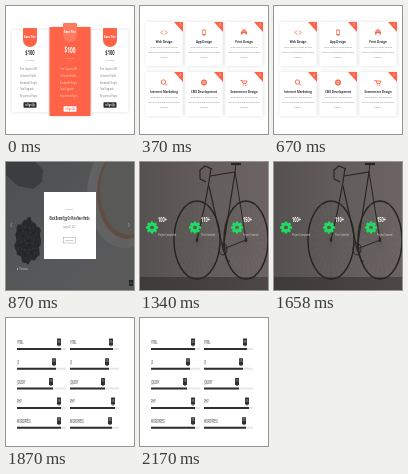
These frames come from a looping animation (128x128 px, 2370 ms). An HTML page with a canvas:

```html
<!DOCTYPE html>
<html lang="en">
<head>
<meta charset="utf-8">
<style>
  html, body { margin: 0; width: 100%; height: 100%; overflow: hidden; background: #fff; }
  canvas { display: block; width: 100vw; height: 100vh; }
</style>
</head>
<body>
<canvas id="stage"></canvas>
<script>
const SIZE = 128;
const canvas = document.getElementById('stage');
const ctx = canvas.getContext('2d');
const CORAL = '#ff6347', DARK = '#2e2e33', GREEN = '#20dc62';
const COLUMNS = [24, 64, 104];

function box(x, y, w, h, fill, radius = 0) {
  ctx.fillStyle = fill;
  ctx.beginPath();
  ctx.roundRect(x, y, w, h, radius);
  ctx.fill();
}

function shape(points, fill) {
  ctx.fillStyle = fill;
  ctx.beginPath();
  points.forEach(([x, y]) => ctx.lineTo(x, y));
  ctx.closePath();
  ctx.fill();
}

function disc(x, y, rx, fill, ry = rx) {
  ctx.fillStyle = fill;
  ctx.beginPath();
  ctx.ellipse(x, y, rx, ry, 0, 0, 7);
  ctx.fill();
}

function line(points, stroke, width) {
  ctx.strokeStyle = stroke;
  ctx.lineWidth = width;
  ctx.beginPath();
  points.forEach(([x, y]) => ctx.lineTo(x, y));
  ctx.stroke();
}

function ring(x, y, rx, stroke, width, ry = rx) {
  ctx.strokeStyle = stroke;
  ctx.lineWidth = width;
  ctx.beginPath();
  ctx.ellipse(x, y, rx, ry, 0, 0, 7);
  ctx.stroke();
}

function gradient(x, y, ...colors) {
  const fill = ctx.createLinearGradient(0, 0, x, y);
  colors.forEach((color, i) => fill.addColorStop(i / (colors.length - 1), color));
  return fill;
}

// The condensed lettering shares one horizontal squeeze.
function label(text, x, y, size, fill, { weight = 400, align = 'center', squeeze = 0.78 } = {}) {
  ctx.save();
  ctx.translate(x, y);
  ctx.scale(squeeze, 1);
  ctx.font = `${weight} ${size}px "Open Sans", sans-serif`;
  ctx.textAlign = align;
  ctx.textBaseline = 'middle';
  ctx.fillStyle = fill;
  ctx.fillText(text, 0, 0);
  ctx.restore();
}

function card(x, y, w, h, fill = '#fff') {
  ctx.save();
  ctx.shadowColor = 'rgba(0,0,0,.13)';
  ctx.shadowBlur = 4 * canvas.width / SIZE;
  box(x, y, w, h, fill);
  ctx.restore();
}

function pricing() {
  box(0, 0, SIZE, SIZE, '#fff');
  const features = ['Free Support 24H', 'Unlimited Traffic', 'Bandwidth Single', 'Total Upgrade', 'Responsive Pages'];
  COLUMNS.forEach((x, i) => {
    const main = i === 1;
    const ink = main ? '#fff' : DARK;
    const soft = main ? '#ffd8cf' : '#77777c';
    if (main) card(43.5, 21, 41, 89, CORAL);
    else card(x - 18, 24, 36, 82);
    const top = main ? 17 : 22;
    box(x - 7, top, 14, 19, main ? '#ff7a60' : CORAL, [1, 1, 7, 7]);
    label('Basic Plan', x, top + 9, 3, '#fff', { weight: 700 });
    label('$100', x, main ? 44.5 : 47.5, main ? 8 : 6.8, ink, { weight: 700, squeeze: 0.6 });
    label('Per Month', x, main ? 52 : 54, 2.3, soft);
    features.forEach((text, row) => {
      label(text, x - 10, 63.5 + row * 6.7, 2.7, soft, { align: 'left' });
    });
    const y = main ? 103 : 99;
    box(x - 6.5, y - 2.8, 13, 5.6, main ? '#fff' : DARK, 0.7);
    disc(x - 4, y, 0.7, main ? CORAL : '#fff');
    label('Sign Up', x + 1, y + 0.1, 2.5, main ? CORAL : '#fff', { weight: 700 });
  });
}

function serviceIcon(kind, x, y) {
  if (kind === 0) {
    line([[x - 1, y - 2], [x - 3, y], [x - 1, y + 2]], CORAL, 0.9);
    line([[x + 1, y - 2], [x + 3, y], [x + 1, y + 2]], CORAL, 0.9);
  } else if (kind === 1) {
    box(x - 1.7, y - 3, 3.4, 6, CORAL, 0.7);
    box(x - 1.1, y - 2, 2.2, 3.5, '#fff');
  } else if (kind === 2) {
    box(x - 3, y - 1.2, 6, 3.2, CORAL, 0.5);
    box(x - 1.8, y - 3, 3.6, 1.3, CORAL);
    box(x - 1.4, y + 0.6, 2.8, 2, '#fff');
  } else if (kind === 3) {
    ring(x - 0.5, y - 0.5, 2.2, CORAL, 0.9);
    line([[x + 1, y + 1], [x + 3, y + 3]], CORAL, 1);
  } else if (kind === 4) {
    ring(x, y, 2.3, CORAL, 1.3);
    line([[x - 3, y], [x + 3, y]], CORAL, 0.7);
    line([[x, y - 3], [x, y + 3]], CORAL, 0.7);
  } else {
    line([[x - 3.5, y - 2], [x - 2, y - 2], [x - 1, y + 1], [x + 2, y + 1], [x + 3, y - 1.5], [x - 2, y - 1.5]], CORAL, 0.9);
    disc(x - 0.7, y + 2.6, 0.7, CORAL);
    disc(x + 1.8, y + 2.6, 0.7, CORAL);
  }
}

function services() {
  box(0, 0, SIZE, SIZE, '#fff');
  const titles = ['Web Design', 'App Design', 'Print Design',
    'Internet Marketing', 'CMS Development', 'Ecommerce Design'];
  const copy = ['Lorem ipsum is simply dummy', 'text of the printing and typesetting', 'industry.'];
  titles.forEach((title, i) => {
    const x = COLUMNS[i % 3], y = i < 3 ? 16 : 66;
    card(x - 18.5, y, 37, 44);
    shape([[x + 10, y], [x + 19, y], [x + 19, y + 10]], CORAL);
    label(i + 1, x + 16, y + 3, 2.5, '#fff', { weight: 700 });
    serviceIcon(i, x, y + 10.5);
    label(title, x, y + 19.8, 3.7, DARK, { weight: 700 });
    copy.forEach((text, row) => label(text, x, y + 25.5 + row * 4.7, 2.5, '#77777c'));
  });
}

function roughStone(x, y, rx, ry, fill) {
  const outline = Array.from({ length: 40 }, (_, i) => {
    const a = i * Math.PI / 20;
    const r = 1 + 0.07 * Math.sin(i * 5.3) + 0.06 * Math.sin(i * 2.1);
    return [x + rx * r * Math.cos(a), y + ry * r * Math.sin(a)];
  });
  shape(outline, fill);
}

function article() {
  box(0, 0, SIZE, SIZE, gradient(SIZE, SIZE, '#4d4e50', '#565758', '#5a5a5b'));

  disc(119, 32, 38, '#626263', 54);
  disc(121, 31, 30, '#604c40', 46);
  disc(123, 29, 29, '#595958', 44);
  shape([[0, 0], [30, 0], [37, 8], [36, 20], [27, 27], [12, 24], [0, 13]], '#3c3d3f');
  roughStone(22, 79, 13, 22, '#28292a');
  for (let i = 0; i < 45; i++) {
    const a = i * 2.4, r = Math.sqrt(i / 45);
    disc(22 + 11 * r * Math.cos(a), 79 + 19 * r * Math.sin(a), 0.9, i % 3 ? '#343536' : '#202122');
  }

  box(38, 30, 52, 67, '#fff');
  label('LIFESTYLE', 63.5, 47, 2.2, '#77777a');
  label('Black Boomi Egg On Plate Near Herbs', 63.5, 56.5, 4.5, DARK, { weight: 700, squeeze: 0.48 });
  label('August 27, 2021', 63.5, 65, 2.7, '#77777a', { squeeze: 0.6 });
  ctx.strokeStyle = '#a5a5a8';
  ctx.lineWidth = 0.5;
  ctx.strokeRect(57.5, 75.5, 12, 5.5);
  label('READ MORE', 63.5, 78.3, 2.3, '#55555a', { squeeze: 0.6 });

  line([[6, 61], [4.5, 63], [6, 65]], '#aaa', 0.6);
  line([[122, 61], [123.5, 63], [122, 65]], '#aaa', 0.6);
  line([[12, 106], [11, 107], [12, 108]], '#ddd', 0.6);
  label('Previous', 13.5, 107, 3, '#ddd', { align: 'left', squeeze: 0.7 });
  box(123, 118, 4, 6, '#242526');
  line([[124, 121.5], [125, 120.5], [126, 121.5]], '#bbb', 0.5);
}

function gear(x, y) {
  ctx.save();
  ctx.translate(x, y);
  for (let i = 0; i < 8; i++) {
    ctx.rotate(Math.PI / 4);
    box(-1.3, -6, 2.6, 4, GREEN, 0.4);
  }
  ctx.restore();
  ring(x, y, 3.4, GREEN, 2.7);
}

function wheel(x, y, rx, ry) {
  for (let i = 0; i < 24; i++) {
    const a = i * Math.PI / 12;
    line([[x, y], [x + rx * Math.cos(a), y + ry * Math.sin(a)]], 'rgba(35,35,35,.2)', 0.3);
  }
  ring(x, y, rx, '#252322', 1.4, ry);
  disc(x, y, 1.3, '#272727', 2);
}

function counters() {
  box(0, 0, SIZE, SIZE, gradient(SIZE, 0, '#555150', '#625c5a', '#6b6462'));
  box(0, 115, SIZE, 13, gradient(SIZE, 0, '#3e3a39', '#4d4745'));
  wheel(57, 78, 23, 39);
  wheel(106, 78, 22, 39);
  const frame = '#282524';
  line([[71, 6], [69, 20], [64, 47], [57, 78]], frame, 1.2);
  line([[70, 14], [95, 10], [83, 87], [69, 24]], frame, 1.2);
  line([[96, 2], [95, 10], [106, 78], [83, 87]], frame, 1);
  line([[91, 2], [101, 2]], frame, 2.2);
  line([[72, 7], [65, 4], [60, 8], [60, 17], [66, 20]], frame, 1.2);
  ring(83, 87, 4, frame, 1, 6);
  line([[83, 87], [87, 99], [90, 99]], frame, 1);

  [[12, '100+', 'Project Completed'], [55, '110+', 'Their Satisfied'], [97, '150+', 'Project Covered']]
    .forEach(([x, total, caption]) => {
      gear(x, 65.5);
      label(total, x + 6, 58.5, 7.2, '#fff', { weight: 700, align: 'left', squeeze: 0.55 });
      label(caption, x + 6, 72.5, 3.9, '#ddd', { align: 'left', squeeze: 0.54 });
    });
}

function skills() {
  box(0, 0, SIZE, SIZE, '#fff');
  const rows = [['HTML', 53, 105], ['JS', 48, 101], ['JQUERY', 45, 97], ['PHP', 53, 107], ['WORDPRESS', 53, 104]];
  rows.forEach(([name, ...ends], row) => {
    const y = 30 + row * 19.7;
    ends.forEach((end, column) => {
      const x = column ? 64 : 11;
      label(name, x, y - 5, 4.7, DARK, { align: 'left', squeeze: 0.5 });
      box(x, y, 49, 2, '#e7e7e8');
      box(x, y, end + 2 - x, 2, DARK);
      box(end - 2, y - 9.5, 4, 7, DARK, 0.5);
      shape([[end - 1, y - 2.5], [end + 1, y - 2.5], [end, y - 1.2]], DARK);
      label(Math.round((end + 2 - x) / 49 * 100) + '%', end, y - 6, 2.6, '#fff', { squeeze: 0.55 });
    });
  });
}

const scenes = [[370, pricing], [870, services], [1340, article], [1870, counters], [2370, skills]];

function render(now) {
  const pixels = Math.round(innerWidth * devicePixelRatio);
  if (canvas.width !== pixels || canvas.height !== pixels) canvas.width = canvas.height = pixels;
  ctx.setTransform(pixels / SIZE, 0, 0, pixels / SIZE, 0, 0);
  const time = now % 2370;
  scenes.find(([end]) => time < end)[1]();
  requestAnimationFrame(render);
}
render(0);
</script>
</body>
</html>
```
